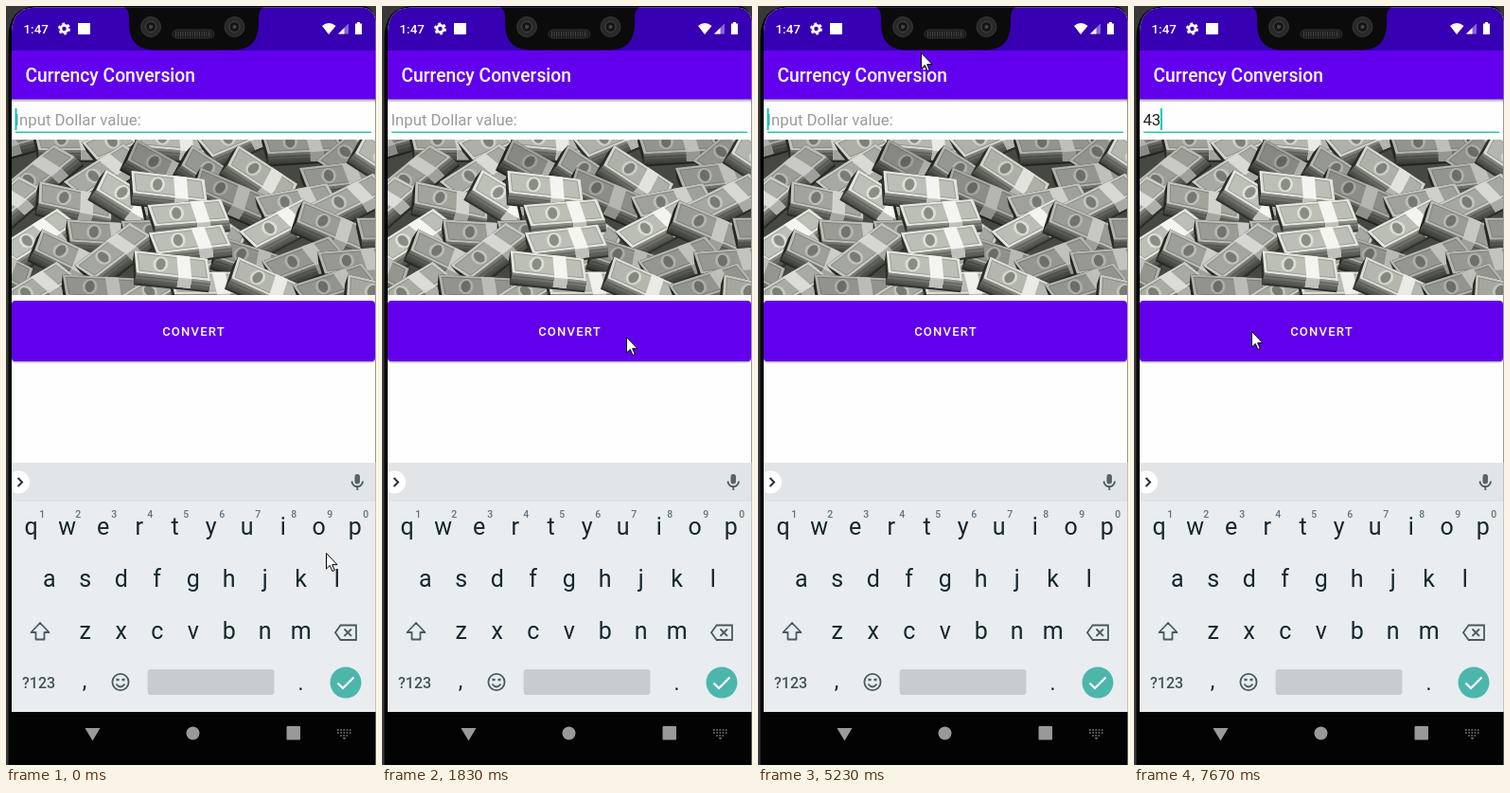
An HTML page for the animation above (8 s loop, 391 px wide and 801 px high).

```html
<!DOCTYPE html>
<html lang="en">
<head>
<meta charset="utf-8">
<title>Currency Conversion</title>
<style>
  html, body { margin: 0; width: 100%; height: 100%; overflow: hidden; background: #050505; }
  svg { display: block; font-family: Roboto, sans-serif; }
  .medium { font-weight: 500; }
  .mid { text-anchor: middle; }
  .icon { fill: none; stroke: #4b5a60; stroke-width: 1.8; }
</style>
</head>
<body>
<svg width="391" height="801" viewBox="0 0 391 801">
  <defs>
    <clipPath id="screen"><path d="M6 801V28Q6 1.500 32 1.500H374Q390 1.500 390.500 18V801Z"/></clipPath>
    <clipPath id="photoBox"><path d="M6 141H390V305H6Z"/></clipPath>
    <linearGradient id="shadow" x2="0" y2="1">
      <stop stop-color="#000" stop-opacity=".34"/><stop offset="1" stop-color="#000" stop-opacity="0"/>
    </linearGradient>
    <linearGradient id="pages" x2="0" y2="1">
      <stop stop-color="#8d9088"/><stop offset="1" stop-color="#3c3e38"/>
    </linearGradient>
    <g id="bundle">
      <path d="M-42-12L36-14L43 13V26L-36 29L-42 0Z" fill="#2b2d28"/>
      <path d="M-36 14L43 12V24L-36 27Z" fill="url(#pages)"/>
      <path d="M-36 18L43 16M-36 22L43 20" stroke="#50524b" stroke-width=".8"/>
      <path d="M-42-12L36-14L43 12L-36 14Z" fill="#d6d8d1"/>
      <path d="M-38-9L33-11L39 9L-33 11Z" fill="#b1b4ab" stroke="#878a81" stroke-width=".8"/>
      <ellipse cx="-12" rx="8" ry="9" fill="#d0d2ca"/>
      <ellipse cx="-12" rx="5" ry="7" fill="#82857c"/>
      <path d="M3-13L17-13.400L23 12.600V24L9 24.400V13Z" fill="#e6e6e2"/>
      <path d="M9 13.200L23 12.600V24L9 24.400Z" fill="#b5b6b1"/>
    </g>
  </defs>

  <!-- bezel -->
  <path d="M0 0H391V801H0Z" fill="#383838"/>
  <path d="M2.500 801V34Q2.500 0 34 0H376Q390 0 390 20V801Z" fill="#040404"/>

  <g clip-path="url(#screen)">
    <path d="M6 0H391V801H6Z" fill="#fefefe"/>
    <path d="M6 0H391V47H6Z" fill="#3700b3"/>
    <path d="M6 47H391V98.500H6Z" fill="#6200ee"/>
    <path d="M6 98.500H391V102H6Z" fill="url(#shadow)"/>

    <!-- status bar -->
    <g fill="#fff">
      <text class="medium" x="18.500" y="29" font-size="13.400">1:47</text>
      <circle cx="61.500" cy="24" r="3.600" fill="none" stroke="#fff" stroke-width="2.800"/>
      <circle cx="61.500" cy="24" r="5.500" fill="none" stroke="#fff" stroke-width="2" stroke-dasharray="2.900 2.860"/>
      <rect x="76" y="18" width="13" height="12"/>
      <path d="M341 30L334 21Q341 15 348.500 21Z"/>
      <path d="M351 29.500L362 18.500V29.500Z" opacity=".4"/>
      <path d="M351 29.500L357.500 23V29.500Z"/>
      <path d="M369 18.500H371V17H374V18.500H376V30H369Z"/>
    </g>

    <!-- notch -->
    <path d="M122 0Q130 2 130 12V20Q131 46.500 157 46.500H240Q266 46.500 267 20V12Q267 2 275 0Z" fill="#0b0b0c"/>
    <g id="lenses"></g>
    <rect x="176" y="25" width="44" height="9" rx="4.500" fill="#1b1b1b" stroke="#303030"/>
    <path d="M179 29.500H217" stroke="#444" stroke-width="6" stroke-dasharray="1 1.500"/>

    <text class="medium" x="20.500" y="80" font-size="19.300" fill="#fff">Currency Conversion</text>

    <!-- input -->
    <text id="value" x="9.400" y="126" font-size="16.800"></text>
    <path d="M10 133.300H386" stroke="#2fc2b3" stroke-width="1.600"/>
    <path id="caret" d="M0 108V131" stroke="#03c8b6" stroke-width="2"/>

    <g clip-path="url(#photoBox)">
      <path d="M6 141H390V305H6Z" fill="#464842"/>
      <g id="photo"></g>
    </g>

    <rect x="6" y="313" width="384" height="65" rx="4" fill="url(#shadow)"/>
    <rect x="6" y="312" width="384" height="64.500" rx="4" fill="#000" opacity=".25"/>
    <rect x="6" y="311" width="384" height="64" rx="4" fill="#6200ee"/>
    <text class="medium mid" x="198.500" y="348" font-size="13.070" letter-spacing="1.170" fill="#fff">CONVERT</text>

    <!-- keyboard -->
    <path d="M6 482H391V523H6Z" fill="#e1e5e7"/>
    <path d="M6 523H391V745H6Z" fill="#e9edf0"/>
    <circle cx="13" cy="502.500" r="12" fill="#fff"/>
    <path d="M12.500 498L17 502.500L12.500 507" fill="none" stroke="#263238" stroke-width="2"/>
    <rect x="368.500" y="494" width="5.500" height="10.500" rx="2.750" fill="#56646a"/>
    <path class="icon" d="M365.500 501.500A5.700 5.700 0 0 0 377 501.500M371.300 507V511"/>
    <g id="keys"></g>
    <path class="icon" d="M36 651L45.500 661H40.500V668.500H31.500V661H26.500Z" stroke-linejoin="round"/>
    <path class="icon" d="M353.500 653.500H370V669H353.500L348 661.200ZM357.500 657.500L365 665M365 657.500L357.500 665"/>
    <text class="medium" x="17" y="720" font-size="16" fill="#43535a">?123</text>
    <circle class="icon" cx="121" cy="713.500" r="8.600"/>
    <path class="icon" d="M116.500 715.500Q121 721.500 125.500 715.500"/>
    <path d="M116.500 711h3M122.500 711h3" stroke="#4b5a60" stroke-width="2.600"/>
    <rect x="149.700" y="700" width="133.800" height="27" rx="3" fill="#c8ccd1"/>
    <circle cx="359" cy="714" r="16.500" fill="#4db6ac"/>
    <path d="M350.500 714.500L356 720L367.500 708.500" fill="none" stroke="#fff" stroke-width="2.200"/>

    <!-- navigation bar -->
    <path d="M6 745H391V801H6Z" fill="#030303"/>
    <g fill="#999">
      <path d="M83.500 762H99.500L91.500 775.500Z"/>
      <circle cx="197.500" cy="767.500" r="7"/>
      <rect x="296.500" y="760" width="14.500" height="14.500" rx="1"/>
    </g>
    <path d="M350 764H365M350 767H365M353 770H362" stroke="#777" stroke-width="1.600" stroke-dasharray="1.800 1.400"/>
    <path d="M355.500 772H359.500L357.500 774Z" fill="#777"/>
  </g>

  <path id="pointer" d="M.5 .5V17L4.300 13.400L7 19.500L9.300 18.500L6.700 12.600H12Z" fill="#fff" stroke="#000"/>
</svg>

<script>
const LOOP = 8000, TICK = 130, BLINK = 500;
const el = id => document.getElementById(id);

const label = (x, y, size, fill, str, cls = "") =>
  `<text class="mid ${cls}" x="${x}" y="${y}" font-size="${size}" fill="${fill}">${str}</text>`;

// Keyboard letters
let keys = label(83, 720, 23, "#14272e", ",") + label(311.5, 722, 23, "#14272e", ".");
["qwertyuiop", "asdfghjkl", "zxcvbnm"].forEach((letters, row) => [...letters].forEach((c, i) => {
  const x = 197.7 + (i - (letters.length - 1) / 2) * 38;
  keys += label(x, 558 + row * 55, 25, "#14272e", c);
  if (!row) keys += label(x + 11.5, 540, 10.5, "#65747a", (i + 1) % 10, "medium");
}));
el("keys").innerHTML = keys;

// Camera lenses in the notch
el("lenses").innerHTML = [153, 241.5].map(x =>
  `<circle cx="${x}" cy="22" r="10.5" fill="#29292a" stroke="#363636"/>
   <circle cx="${x}" cy="22" r="5.500" fill="#151515" stroke="#444"/>
   <circle cx="${x}" cy="22" r="2" fill="#484848"/>`).join("");

// Heap of banknote bundles: scattered rows, then a brighter pile in the middle
let seed = 11;
const random = () => (seed = seed * 16807 % 2147483647) / 2147483647;
const spread = size => (random() - 0.5) * size;
const bundle = (x, y, angle, light) =>
  `<use href="#bundle" transform="translate(${x} ${y}) scale(1 .88) rotate(${angle})" style="filter:brightness(${light})"/>`;
let heap = "";
for (let row = 0; row < 6; row++) {
  for (let col = 0; col < 7; col++) {
    heap += bundle(col * 62 + row % 2 * 31 + spread(24), 142 + row * 31 + spread(16), spread(85), 0.75 + random() * 0.32);
  }
}
for (let i = 0; i < 4; i++) {
  heap += bundle(172 + 24 * Math.sin(i), 190 + 28 * i, 9 * Math.cos(2 * i), 1.06);
}
el("photo").innerHTML = heap;

// Pointer path: tick, x, y
const path = [
  [1, 338, 577], [4, 257, 694], [5, 262, 741], [8, 262, 741], [10, 304, 782],
  [12, 289, 433], [14, 258, 349], [16, 152, 206], [39, 152, 206], [40, 172, 49],
  [41, 168, 41], [44, 103, 120], [52, 103, 120], [53, 123, 304], [55, 124, 343]
];

function pointerAt(tick) {
  const next = path.findIndex(point => point[0] > tick);
  if (next < 1) return path.at(next).slice(1);
  const [t0, x0, y0] = path[next - 1], [t1, x1, y1] = path[next];
  const k = (tick - t0) / (t1 - t0);
  return [x0 + (x1 - x0) * k, y0 + (y1 - y0) * k];
}

function draw(t) {
  const pos = pointerAt(Math.floor((t + 10) / TICK)).map(Math.round);
  el("pointer").setAttribute("transform", `translate(${pos})`);

  const edited = [0, 6390, 6640].filter(time => time <= t);
  const typed = "43".slice(0, edited.length - 1);
  el("value").textContent = typed || "Input Dollar value:";
  el("value").setAttribute("fill", typed ? "#212121" : "#9b9b9b");

  // Each edit restarts the caret's blink
  const hidden = Math.floor((t - edited.at(-1)) / BLINK) % 2;
  el("caret").setAttribute("visibility", hidden ? "hidden" : "visible");
  el("caret").setAttribute("transform", `translate(${10.5 + typed.length * 9.2} 0)`);
}

const start = performance.now();
function frame() {
  draw((performance.now() - start) % LOOP);
  requestAnimationFrame(frame);
}
frame();
</script>
</body>
</html>
```
